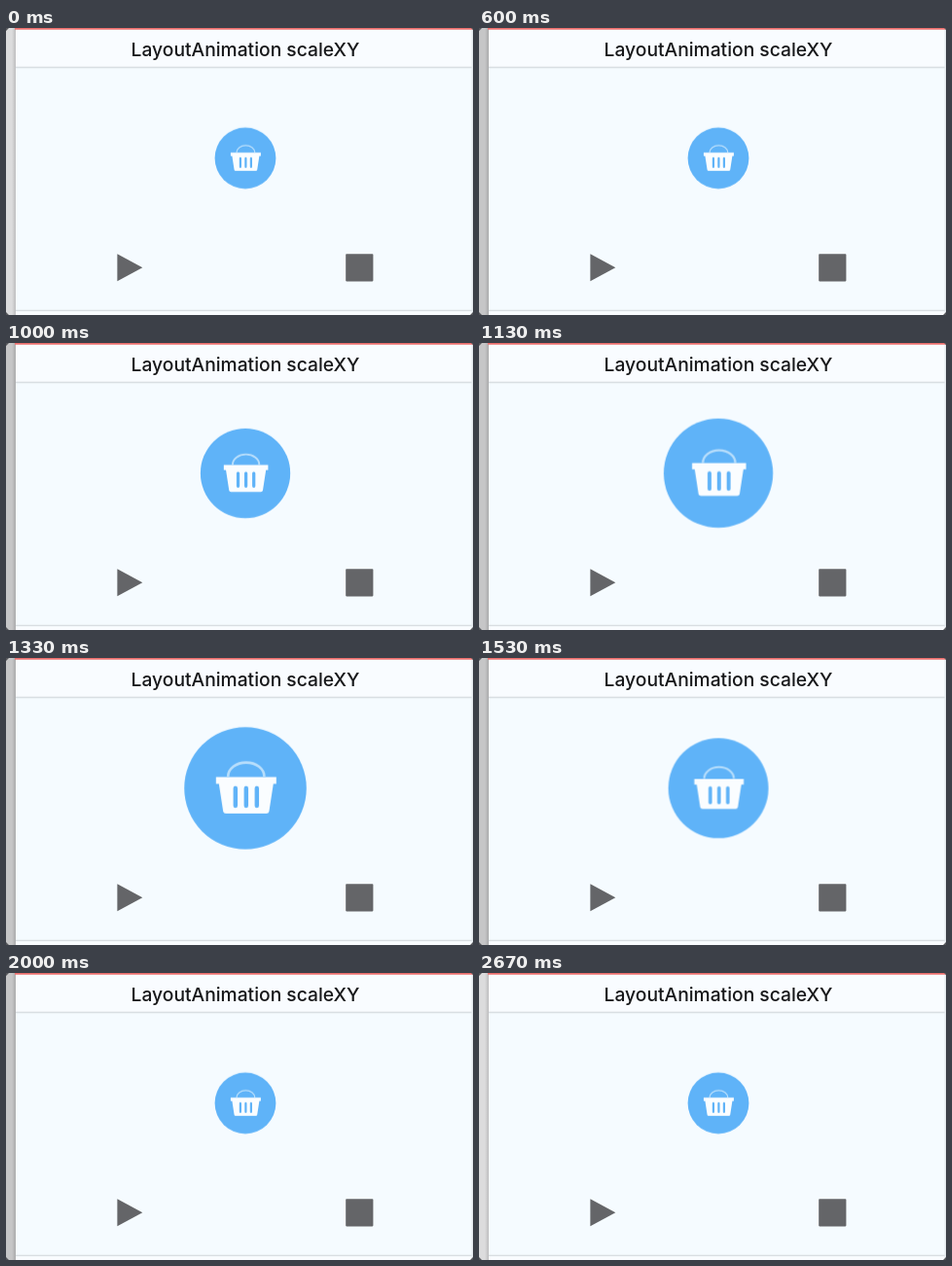
These frames come from a looping animation (480x295 px, 2.74 s). An HTML page:

```html
<!DOCTYPE html>
<html lang="en">
<head>
<meta charset="utf-8">
<title>LayoutAnimation scaleXY</title>
<style>
  html, body { margin: 0; width: 100%; height: 100%; overflow: hidden; background: #f5fbff; }
  svg { display: block; width: 480px; height: 295px; }
  .title { font: 450 19.25px Inter, "Liberation Sans", sans-serif; fill: #17181a; text-anchor: middle; }
  .icon { transform-origin: 0 0; animation: pulse 2740ms infinite; }
  .edge { animation: shade 2740ms linear infinite; }

  @keyframes pulse {
    0%, 25% { transform: scale(1); animation-timing-function: ease-in-out; }
    48.9% { transform: scale(2); animation-timing-function: linear; }
    49.6% { transform: scale(2); animation-timing-function: ease-in-out; }
    64.6%, 100% { transform: scale(1); }
  }
  @keyframes shade {
    0%, 2.55% { fill: #dcdcdd; }
    17.15%, 73% { fill: #c6c6c7; }
    77.74%, 100% { fill: #dcdcdd; }
  }
</style>
</head>
<body>
<svg viewBox="0 0 480 295">
  <defs>
    <linearGradient id="shadow">
      <stop offset="0" stop-color="#000" stop-opacity="0"/>
      <stop offset="1" stop-color="#000" stop-opacity=".14"/>
    </linearGradient>
  </defs>

  <rect width="480" height="295" fill="#f5fbff"/>
  <rect x="10" width="470" height="40" fill="#f9fcff"/>
  <rect x="10" y="39.7" width="470" height="1.6" fill="#d9dee2"/>
  <rect x="10" y="289.7" width="470" height="1.6" fill="#d9dee2"/>
  <rect x="10" y="291.3" width="470" height="3.7" fill="#fafcff"/>
  <rect x="478.5" y="2" width="1.5" height="293" fill="#e6ebef"/>

  <rect class="edge" width="10" height="295"/>
  <rect x="6" width="4" height="295" fill="url(#shadow)"/>
  <rect x="9" width="471" height="1.7" fill="#ee706e"/>

  <!-- screen corners -->
  <path d="M0 0h3L0 3zM480 0h-2l2 2zM0 295v-3l3 3zM480 295v-3l-3 3z" fill="#55565a"/>

  <text class="title" x="246" y="29">LayoutAnimation scaleXY</text>

  <g transform="translate(246 133.8)">
    <g class="icon">
      <circle r="31.4" fill="#5fb3f8"/>
      <g transform="translate(.4 0)">
        <path d="M-9.3 -6A9.3 7.2 0 0 1 9.3 -6" fill="none" stroke="#b9dffc" stroke-width="1.3"/>
        <path d="M-15.5 -5.8H15.5V-2.2H14L11.8 12Q11.6 13 10.4 13H-10.4Q-11.6 13 -11.8 12L-14 -2.2H-15.5Z" fill="#fafdff"/>
        <path d="M-5.5 0V9M0 0V9M5.5 0V9" stroke="#5fb3f8" stroke-width="2.2" stroke-linecap="round"/>
      </g>
    </g>
  </g>

  <path d="M114.4 232.2L140.3 246.2L114.4 260.2Z" fill="#646568"/>
  <rect x="349.2" y="232.2" width="28.2" height="28.2" rx=".8" fill="#646568"/>
</svg>
</body>
</html>
```
